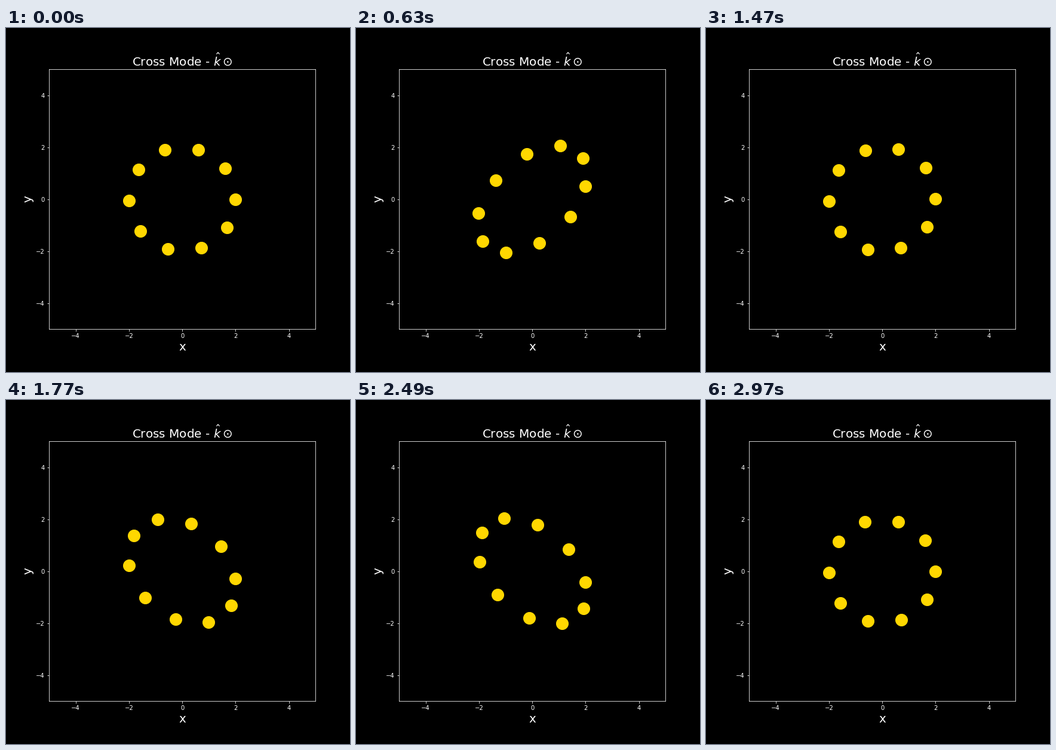
These frames come from a looping animation (576 px wide and 576 px high, 3000 ms). A matplotlib script:

```python
import numpy as np
import matplotlib.pyplot as plt
from matplotlib.animation import FuncAnimation

FRAMES, INTERVAL = 100, 30
RADIUS, STRAIN = 2, 0.25

plt.style.use("dark_background")
plt.rcParams.update({"font.family": "DejaVu Sans", "font.size": 10})

fig, ax = plt.subplots(figsize=(8, 8), dpi=72)
fig.subplots_adjust(left=0.125, right=0.9, bottom=0.125, top=0.88)
ax.set(xlim=(-5, 5), ylim=(-5, 5))
ticks = range(-4, 5, 2)
ax.set_xticks(ticks)
ax.set_yticks(ticks)
ax.set_title(r"Cross Mode - $\hat{k}\odot$", fontsize=20)
ax.set_xlabel("x", fontsize=20)
ax.set_ylabel("y", fontsize=20)

# Ring of test masses: every tenth point of a closed circle
theta = np.linspace(0, 2 * np.pi, 100)[::10]
x0, y0 = RADIUS * np.cos(theta), RADIUS * np.sin(theta)
masses, = ax.plot(x0, y0, "o", color="gold", markersize=20)


def update(i):
    h = STRAIN * np.sin(2 * np.pi * i / (FRAMES - 1))
    masses.set_data(x0 + h * y0, y0 + h * x0)
    return masses,


anim = FuncAnimation(fig, update, frames=FRAMES, interval=INTERVAL,
                     repeat=True, repeat_delay=0)
plt.show()
```
